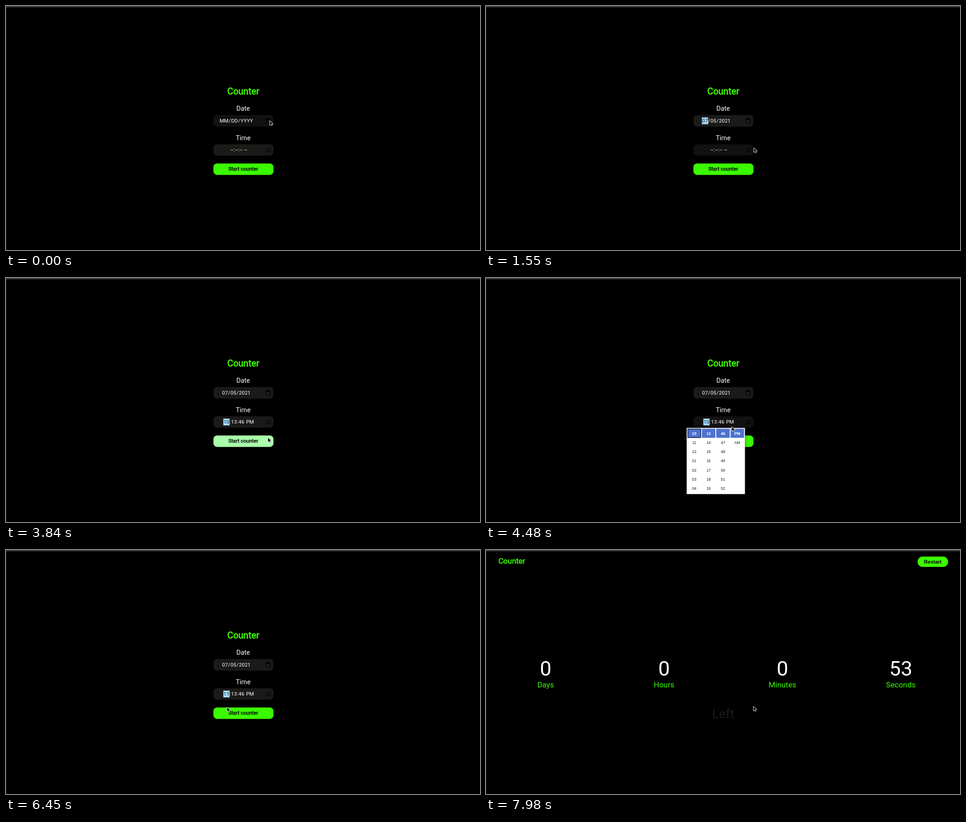
Write an HTML page with a canvas that moves like this. It is 1042 px wide and 538 px high and loops after 8 s.

```html
<!DOCTYPE html>
<html lang="en">
<head>
<meta charset="utf-8">
<title>Counter</title>
<style>
  html, body { margin: 0; width: 100%; height: 100%; overflow: hidden; background: #000; }
  canvas { display: block; }
</style>
</head>
<body>
<canvas id="stage" width="1042" height="538"></canvas>
<script>
const ctx = document.getElementById('stage').getContext('2d');
const LOOP = 8000, COUNTER_AT = 7840;
const GREEN = '#3bf900', BLUE = '#4d72d1', SKY = '#a8dafb', INK = '#1c1c1c';
const ROBOTO = 'Roboto, sans-serif', ARIAL = '"Liberation Sans", Arial, sans-serif';
const TEXT = 11.27, PAD = 0.56;
const FIELD = { x: 456, w: 132, h: 25.2, dateY: 240.5, timeY: 304.9, buttonY: 347.2 };
const CELL = { w: 31.55, h: 20.27 };

const point = (x, y) => ({ x, y });
const START = point(580, 253), DATE_ICON = point(576, 249), DAY = point(484, 326);
const TIME_ICON = point(574, 317), HOUR = point(460, 354), MINUTE = point(492, 366);
const ABOVE = point(628, 281), BUTTON = point(576, 352), BESIDE = point(588, 345);
const FIELD_END = point(589, 313), RIGHT = point(600, 312), LEFT = point(452, 358);

// Pointer moves: departure, arrival, destination
const MOVES = [
  [40, 50, DATE_ICON], [400, 890, DAY], [1210, 1540, FIELD_END], [1630, 1860, TIME_ICON],
  [2040, 2400, HOUR], [3040, 3430, ABOVE], [3500, 3830, BUTTON], [3900, 4200, TIME_ICON],
  [4330, 4750, HOUR], [4950, 5500, RIGHT], [5860, 6250, LEFT], [6270, 6790, TIME_ICON],
  [6840, 7080, MINUTE], [7210, 7420, BESIDE], [7510, 7680, BUTTON], [7830, 7975, BESIDE]
];

const DATE_POPUP = { from: 300, to: 1210 };
const TIME_POPUPS = [
  { from: 1950, to: 3480, hour: 11, picked: 3040, column: 0, value: 10, scrolls: true },
  { from: 4300, to: 5600, hour: 10, picked: 4950, column: 0, value: 11 },
  { from: 6830, to: 7400, hour: 11, picked: 7190, column: 1, value: 14 }
];

const within = (v, a, b) => v >= a && v < b;
const isOpen = (popup, t) => within(t, popup.from, popup.to);
const progress = (t, a, b) => Math.max(0, Math.min(1, (t - a) / (b - a)));
const smooth = k => k * k * (3 - 2 * k);
const two = n => String(n).padStart(2, '0');

function pointerAt(t) {
  return MOVES.reduce((at, [from, to, goal]) => {
    const k = smooth(progress(t, from, to));
    return point(at.x + (goal.x - at.x) * k, at.y + (goal.y - at.y) * k);
  }, START);
}

function rect(x, y, w, h, color) {
  ctx.fillStyle = color;
  ctx.fillRect(x, y, w, h);
}

function pill(x, y, w, h, r, color) {
  ctx.fillStyle = color;
  ctx.beginPath();
  ctx.roundRect(x, y, w, h, r);
  ctx.fill();
}

function label(text, x, y, size, color, { family = ROBOTO, weight = 400, align = 'center', embolden = false } = {}) {
  ctx.font = `${weight} ${size}px ${family}`;
  ctx.textAlign = align;
  ctx.fillStyle = color;
  ctx.fillText(text, x, y);
  if (embolden) {
    ctx.strokeStyle = color;
    ctx.lineWidth = size / 25;
    ctx.lineJoin = 'miter';
    ctx.strokeText(text, x, y);
  }
}

function line(color, width, ...points) {
  ctx.strokeStyle = color;
  ctx.lineWidth = width;
  ctx.beginPath();
  points.forEach(([x, y]) => ctx.lineTo(x, y));
  ctx.stroke();
}

// Editable parts sit between plain separators; the first part may be selected.
function inputText(text, center, baseline, selected) {
  const parts = text.match(/[^\/: ]+|[\/: ]/g);
  ctx.font = `400 ${TEXT}px ${ROBOTO}`;
  const sizes = parts.map(p => ctx.measureText(p).width + (/[\/: ]/.test(p) ? 0 : 2 * PAD));
  let x = center - sizes.reduce((a, b) => a + b) / 2;
  parts.forEach((part, i) => {
    const active = selected && i === 0;
    if (active) rect(x, baseline - 11.3, sizes[i], 15, SKY);
    label(part, x + sizes[i] / 2, baseline, TEXT, active ? '#123' : '#fff');
    x += sizes[i];
  });
}

function calendarIcon(x, y) {
  ctx.strokeStyle = '#000';
  ctx.lineWidth = 1.1;
  ctx.strokeRect(x - 4.7, y - 4.7, 9.4, 9.6);
  rect(x - 5.2, y - 5.2, 10.4, 2.8, '#000');
  for (const side of [-1, 1]) rect(x + side * 2.7 - 0.6, y - 6.4, 1.2, 2, '#000');
}

function clockIcon(x, y) {
  ctx.strokeStyle = '#000';
  ctx.lineWidth = 1.1;
  ctx.beginPath();
  ctx.arc(x, y, 4.7, 0, 7);
  ctx.stroke();
  line('#000', 1.1, [x, y - 2.8], [x, y + 0.3], [x + 2.2, y + 1.7]);
}

function panel(x, y, w, h) {
  ctx.save();
  ctx.shadowColor = 'rgba(0,0,0,.45)';
  ctx.shadowBlur = 9;
  rect(x, y, w, h, '#b9b9b9');
  ctx.restore();
  rect(x + 0.6, y + 0.6, w - 1.2, h - 1.2, '#fff');
}

function arrow(x, y, dir) {
  line('#333', 0.9, [x, y - 3.5 * dir], [x, y + 3.5 * dir]);
  line('#333', 0.9, [x - 3, y + 0.6 * dir], [x, y + 3.5 * dir], [x + 3, y + 0.6 * dir]);
}

function datePopup(mouse) {
  const pitch = 18.9, row = 16.4, left = 456, top = 304;
  panel(450, 266.5, 144, 157.5);
  label('July 2021 ▾', 459, 283, 8.45, INK, { family: ARIAL, weight: 700, align: 'left' });
  arrow(563, 280, -1);
  arrow(581, 280, 1);
  [...'SMTWTFS'].forEach((d, i) => label(d, left + pitch * (i + 0.5), 300, 7.5, '#444', { family: ARIAL }));
  for (let i = 0; i < 42; i++) {
    const day = i - 3, x = left + pitch * (i % 7), y = top + row * Math.floor(i / 7);
    const inside = within(day, 1, 32), today = day === 5;
    const hover = within(mouse.x, x, x + pitch) && within(mouse.y, y, y + row);
    if (today || hover) rect(x + 0.5, y + 0.5, pitch - 1, row - 1, today ? BLUE : SKY);
    const shown = inside ? day : day < 1 ? day + 30 : day - 31;
    label(shown, x + pitch / 2, y + 11, 7.9, today ? '#fff' : inside ? INK : '#999',
      { family: ARIAL, weight: today ? 700 : 400 });
  }
  label('Clear', 459, 416, 7.9, BLUE, { family: ARIAL, align: 'left' });
  label('Today', 586, 416, 7.9, BLUE, { family: ARIAL, align: 'right' });
}

function timePopup(popup, t, mouse) {
  const chosen = [popup.hour, 13, 46, 'PM'];
  if (t >= popup.picked) chosen[popup.column] = popup.value;
  const scroll = popup.scrolls ? 29.8 * progress(t, 2400, 2700) : 0;
  const columns = [
    i => (popup.hour + i + 23) % 12 + 1,
    i => 13 + i,
    i => 46 + i,
    i => ['PM', 'AM'][i]
  ];
  const over = within(mouse.x, 441, 569) && within(mouse.y, 331, 476);
  const focus = over ? Math.min(3, Math.floor((mouse.x - 441) / CELL.w)) : 0;

  panel(441, 330.4, 128.4, 146.2);
  ctx.save();
  ctx.beginPath();
  ctx.rect(442, 332, 127, 143);
  ctx.clip();
  columns.forEach((valueAt, col) => {
    const x = 443 + CELL.w * col;
    for (let i = -2; i < 7; i++) {
      const value = valueAt(i);
      if (value === undefined) continue;
      const y = 332.4 + CELL.h * i + (col === 0 ? scroll : 0);
      const active = value === chosen[col];
      const hover = focus === col && over && within(mouse.y, y, y + CELL.h);
      if (active || hover) rect(x, y, 29.6, 20, active ? BLUE : SKY);
      if (active && focus === col) {
        ctx.strokeStyle = '#10131d';
        ctx.lineWidth = 1.3;
        ctx.strokeRect(x + 0.6, y + 0.6, 28.4, 18.8);
      }
      label(col < 3 ? two(value) : value, x + 14.8, y + 13.1, 8.45,
        active ? '#fff' : INK, { family: ARIAL, weight: active ? 700 : 400 });
    }
  });
  ctx.restore();
}

function timeText(t) {
  const [first, second, third] = TIME_POPUPS;
  if (t < first.picked) return '--:--:-- --';
  return `${t < second.picked ? 10 : 11}:${t < third.picked ? 13 : 14}:46 PM`;
}

function formScreen(t, mouse) {
  const dateOpen = isOpen(DATE_POPUP, t);
  const timeOpen = TIME_POPUPS.find(p => isOpen(p, t));
  // The hover shade lags a little behind a pointer leaving to the right.
  const hovers = (y, slack) => !dateOpen && !timeOpen &&
    within(mouse.x, FIELD.x, FIELD.x + FIELD.w + slack) && within(mouse.y, y, y + FIELD.h);
  const box = (y, color) => pill(FIELD.x, y, FIELD.w, FIELD.h, 8, color);
  const shade = dark => dark ? '#111111' : '#1a1a19';

  label('Counter', 521.6, 194.7, 20, GREEN, { embolden: true });
  label('Date', 521.4, 231.4, 14.43, '#fff');
  box(FIELD.dateY, shade(hovers(FIELD.dateY, 0)));
  inputText(t < DATE_POPUP.to ? 'MM/DD/YYYY' : '07/05/2021', 506.2, 257, within(t, DATE_POPUP.from, TIME_POPUPS[0].from));
  calendarIcon(576.7, 253.2);

  label('Time', 521.4, 295.7, 14.43, '#fff');
  box(FIELD.timeY, shade(timeOpen || hovers(FIELD.timeY, 14)));
  inputText(timeText(t), 511.6, 321.3, t >= TIME_POPUPS[0].from);
  clockIcon(577.5, 317.4);

  box(FIELD.buttonY, hovers(FIELD.buttonY, 0) ? '#aaffaa' : GREEN);
  label('Start counter', 521.6, 363.3, TEXT, '#000', { embolden: true });

  if (dateOpen) datePopup(mouse);
  if (timeOpen) timePopup(timeOpen, t, mouse);
}

function counterScreen() {
  label('Counter', 27.2, 30.4, 16.75, GREEN, { align: 'left', embolden: true });
  pill(948.7, 14.6, 67.2, 22.6, 11.3, GREEN);
  label('Restart', 982.2, 30, TEXT, '#000', { family: ARIAL, weight: 700 });
  ['Days', 'Hours', 'Minutes', 'Seconds'].forEach((unit, i) => {
    const x = 1 + 260.25 * (i + 0.5);
    label(unit === 'Seconds' ? '53' : '0', x, 276.5, 45.08, '#fff');
    label(unit, x, 303, 16.9, GREEN);
  });
  label('Left', 521.5, 370.8, 28.18, '#1a1a1a');
}

function pointer({ x, y }) {
  const shape = [[0, 0.5], [0, 9.2], [2.1, 7.4], [3.5, 10.3], [5.1, 9.6], [3.9, 6.8], [6.7, 6.6]];
  ctx.beginPath();
  shape.forEach(([dx, dy]) => ctx.lineTo(x + dx, y + dy));
  ctx.closePath();
  ctx.lineWidth = 1.7;
  ctx.lineJoin = 'round';
  ctx.strokeStyle = '#e6e6e6';
  ctx.stroke();
  ctx.fillStyle = '#161616';
  ctx.fill();
}

function draw(t) {
  const mouse = pointerAt(t);
  rect(0, 0, 1042, 538, '#000');
  rect(0, 0, 1, 538, '#1e1e1e');
  rect(0, 0, 1042, 3, '#3a3a3a');
  if (t < COUNTER_AT) formScreen(t, mouse);
  else counterScreen();
  pointer(mouse);
}

const start = performance.now();
function tick() {
  draw((performance.now() - start) % LOOP);
  requestAnimationFrame(tick);
}
tick();
</script>
</body>
</html>
```
